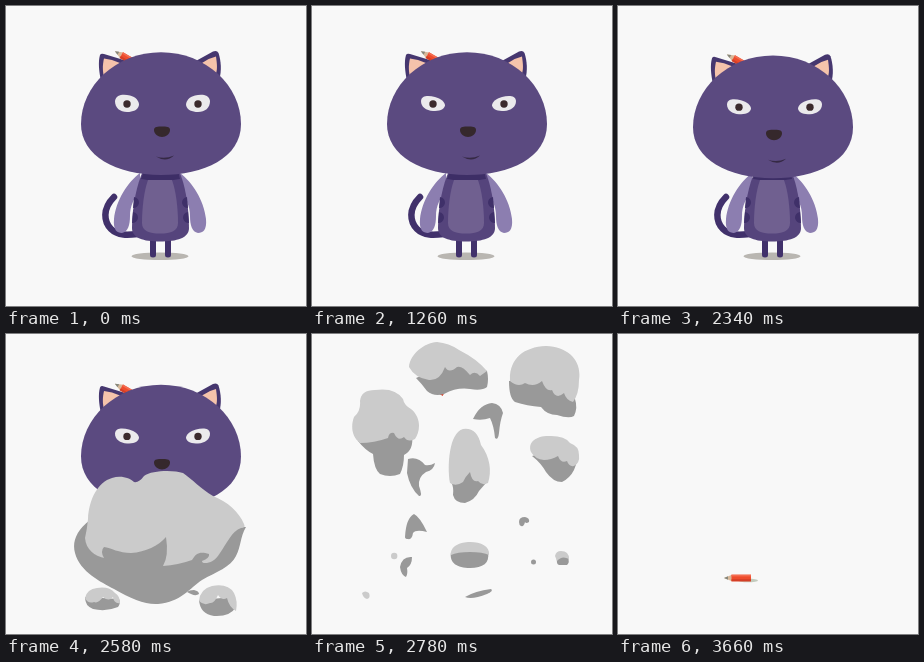
An HTML page that plays this animation: 300x300 px, repeating every 6.5 s.

```html
<!DOCTYPE html>
<html lang="en">
<head>
<meta charset="utf-8">
<title>Cat in smoke</title>
<style>
html, body { margin: 0; width: 100%; height: 100%; overflow: hidden; background: #f8f8f8; }
svg { display: block; width: 100%; height: 100%; }
.light { fill: #cbcbcb; }
.dark { fill: #999; }
</style>
</head>
<body>
<svg viewBox="0 0 300 300">
  <ellipse id="catShadow" cx="154" cy="250.3" rx="28.5" ry="3.8" fill="#b9b6b1"/>
  <ellipse id="pencilShadow" cx="130" cy="246.4" rx="10" ry="1.8" fill="#c3cbbd"/>

  <g id="body">
    <path d="M108 191C96 203 98 216 105 223C112 230 122 229 132 228" fill="none" stroke="#41316b" stroke-width="6.5" stroke-linecap="round"/>
    <g fill="#41316b">
      <path d="M144 232h6v17q0 2.5-3 2.5t-3-2.5z"/>
      <path d="M159 232h6v17q0 2.5-3 2.5t-3-2.5z"/>
    </g>
    <g fill="#8c7eb0">
      <path id="arm" d="M134 167C122 176 110 194 108 213C107 224 111 227 116 227C122 226 124 219 124 210C124 200 128 192 134 185z"/>
      <use href="#arm" transform="matrix(-1 0 0 1 308 0)"/>
    </g>
    <path d="M137 165H173C179 178 183 200 183 222C183 232 171 235.500 154 235.500C137 235.500 126 232 126 222C126 200 131 178 137 165z" fill="#55447c"/>
    <path d="M138 165H172L174 173Q154 177 135 173z" fill="#3d2e66"/>
    <g id="spots" fill="#3f3069">
      <path d="M128 191Q133 192 133 197Q132 202 127 202z"/>
      <path d="M127 206Q132 207 132 212Q131 217 126 217z"/>
    </g>
    <use href="#spots" transform="matrix(-1 0 0 1 309 0)"/>
    <path d="M142 174H166C170 185 172 202 172 217C172 225 165 227.500 154 227.500C143 227.500 136 225 136 217C136 202 138 185 142 174z" fill="#706090"/>
  </g>

  <g id="ears">
    <path d="M95 75C93 65 92 56 94 49Q95 47 98 48L121 55z" fill="#46376f"/>
    <path d="M98 71C96 63 97 57 98 52.500Q106 53 114 57z" fill="#f5c3ab"/>
    <path d="M188 56L207 45.500Q211 44 212.500 47C215 55 216 64 213 75z" fill="#46376f"/>
    <path d="M196 57Q203 52 210 50.500C211 58 212 64 209 70z" fill="#f5c3ab"/>
  </g>

  <g id="pencil">
    <path d="M-14 0L-6-3.300V3.300z" fill="#d8b899"/>
    <path d="M-14 0L-10-1.700V1.700z" fill="#85877c"/>
    <path d="M-6.500-3.300H13V3.300H-6.500z" fill="#ee4c2d"/>
    <path d="M-6.500 1.200H13V3.300H-6.500z" fill="#d43f27"/>
    <path d="M-6.500-3.300H13V-1.600H-6.500z" fill="#f46c50"/>
  </g>

  <g id="head">
    <path d="M155 46.300C200 46.300 235 80 235 118C235 152 198 169 155 169C110 169 75 150 75 118C75 80 110 46.300 155 46.300z" fill="#5b4a80"/>
    <g id="eye">
      <path id="white" fill="#ebeaec"/>
      <circle cx="121" cy="98" r="3.700" fill="#3b2a2c"/>
    </g>
    <use href="#eye" transform="matrix(-1 0 0 1 313 0)"/>
    <path d="M148 124C148 120.500 152 120.500 156 120.500C160 120.500 164 120.500 164 124C164 128 160 131 156 131C152 131 148 128 148 124z" fill="#35282c"/>
    <path d="M150 150.500Q159 153.500 168 149.500Q160 157 150 150.500z" fill="#352944"/>
  </g>

  <g id="cloud">
    <path class="dark" d="M84 186C70 197 66 208 69 219C74 238 95 248 108 255C125 265 140 271 152 270C175 268 184 254 196 246C210 238 225 233 230 222C235 213 234 203 240 193z"/>
    <path class="light" d="M82 185C83 165 92 148 106 144C115 141 124 144 128 148Q133 149 138 142C146 136 168 136 177 139C186 145 195 155 207 162C222 168 233 178 238 190Q240 194 235 194C226 197 221 209 214 219C209 227 204 229 199 229Q196 229 196 227Q204 224 203 220C194 217 190 219 186 226Q172 231 157 232Q163 222 160 203C152 212 140 218 125 219C113 219 105 214 98 213Q94 217 98 224C89 222 80 216 79 204Q81 196 82 185z"/>
    <path class="dark" d="M181 258Q183 256 188 256Q193 257 193 260Q189 263 181 258z"/>
    <path class="dark" d="M79 263Q79 272 87 275Q100 278 112 273Q115 269 113 265z"/>
    <path class="light" d="M79 264Q81 255 91 254Q103 252 109 259Q114 262 114 269Q108 270 107 263Q103 268 97 263Q92 270 88 268Q82 270 79 264z"/>
    <path class="dark" d="M193 266Q194 280 208 282Q224 283 230 273L228 263z"/>
    <path class="light" d="M193 267Q194 255 206 252Q222 249 228 259Q232 267 230 277Q223 273 221 264Q216 267 212 261Q208 270 204 269Q198 272 193 267z"/>
  </g>
  <g id="puffs"></g>
</svg>

<script>
const LOOP = 6500, STEP = 40;
const $ = id => document.getElementById(id);
const clamp = v => Math.min(1, Math.max(0, v));
const part = (t, a, b) => clamp((t - a) / (b - a));
const mix = (a, b, p) => a + (b - a) * p;
const smooth = p => p * p * (3 - 2 * p);
const easeOut = p => 1 - (1 - p) ** 2;
const show = (el, on) => el.style.display = on ? "" : "none";

// centre x, centre y, dark path, light path
const PUFFS = [
  [136, 35, "M104 44Q110 50 115 57Q122 63 132 60Q145 53 158 55Q170 57 175 53Q177 45 175 37L150 27L130 33z",
    "M97 33C98 20 112 9 125 8Q137 9 147 16Q165 25 175 37L168 42Q163 36 158 41Q150 31 145 33Q137 40 133 33Q128 47 117 46Q103 44 97 33z"],
  [232, 47, "M197 47Q197 64 203 68Q215 72 229 73Q235 81 245 81Q257 85 262 82Q266 74 263 65L240 42z",
    "M198 47C197 25 211 13 234 12C257 13 270 27 267 46Q267 60 261 68Q254 66 252 59Q244 66 240 56Q234 58 230 47Q222 54 213 49Q206 54 198 47z"],
  [74, 98, "M46 107Q53 116 61 120Q62 135 68 140Q78 144 88 140Q92 132 92 121Q102 116 100 101L80 90z",
    "M48 109C39 102 39 91 42 83Q49 77 48 67Q49 56 63 56Q83 53 91 65Q92 71 99 75C110 84 108 98 103 105Q96 109 92 103Q86 108 82 99Q77 98 76 104Q62 109 48 109z"],
  [157, 132, "M139 148Q142 153 141 161Q143 169 153 169Q163 166 167 157L174 149L158 136z",
    "M138 149C135 132 137 99 151 95Q165 93 169 111C178 123 180 137 176 149Q170 152 166 147Q160 149 158 138Q153 143 151 148Q144 153 138 149z"],
  [243, 125, "M220 122Q229 129 234 138Q241 148 250 148Q258 144 262 136Q264 131 266 124L240 116z",
    "M219 118C215 107 226 101 239 102Q253 102 258 109Q267 112 267 121Q268 129 262 132Q257 133 255 127Q249 130 246 122Q239 126 232 126Q223 125 219 118z"],
  [177, 87, "M161 85Q168 70 180 69Q189 70 191 79Q188 87 187 99Q186 107 183 104Q182 92 178 84Q170 87 161 85z"],
  [109, 142, "M96 125Q106 122 113 131Q118 132 123 129Q122 136 114 138Q106 143 107 152Q111 163 107 162Q98 154 95 139z"],
  [104, 193, "M93 203Q94 184 102 180Q108 183 115 198Q104 195 101 199Q100 206 96 205Q93 205 93 203z"],
  [94, 233, "M100 223Q90 222 88 233Q89 241 94 243Q96 240 95 234Q100 231 100 223z"],
  [166, 260, "M153 263Q163 257 179 255Q182 257 175 260Q160 266 153 263z"],
  [158, 221, "M139 218C137 229 145 234 158 234C171 234 178 229 176 218z",
    "M139 221C138 212 148 208 158 208C169 208 178 212 177 221Q171 218 158 218Q145 218 139 221z"],
  [212, 187, "M207 188Q207 183 213 183Q218 184 217 188Q214 190 213 188Q212 193 209 192Q207 191 207 188z"],
  [250, 224, "M245 223Q244 230 247 231H255Q258 228 256 223z",
    "M243 222Q244 217 249 217Q257 217 257 225Q250 221 245 227z"],
  [221, 228, "M219 228a2.500 2.500 0 1 0 5 0a2.500 2.500 0 1 0-5 0z"],
  [82, 222, "", "M79 222a3.200 3.200 0 1 0 6.400 0a3.200 3.200 0 1 0-6.400 0z"],
  [54, 261, "", "M50 259Q53 256 57 259Q59 264 55 265Q51 264 50 259z"]
];

const puffs = PUFFS.map(([x, y, dark, light]) => {
  const el = document.createElementNS("http://www.w3.org/2000/svg", "g");
  el.innerHTML = `<path class="dark" d="${dark}"/>` + (light ? `<path class="light" d="${light}"/>` : "");
  $("puffs").append(el);
  return { x, y, el };
});

const scaleAt = (x, y, s, dx = 0, dy = 0) =>
  `translate(${x + dx} ${y + dy}) scale(${s}) translate(${-x} ${-y})`;

// Open and narrowed outlines of the left eye
const OPEN = [109, 95, 110, 88, 118, 88, 124, 89.5, 130, 91, 133, 95, 133, 99, 132, 104, 127, 106, 121, 106, 114, 106, 109, 102, 109, 95];
const NARROW = [109, 95, 109.5, 89, 117, 89.5, 123, 91, 129, 92.5, 133, 96, 133, 99.5, 132, 104, 127, 105, 121, 105, 114, 104.5, 109, 101, 109, 95];

function drawEye(p) {
  const v = OPEN.map((a, i) => mix(a, NARROW[i], p));
  $("white").setAttribute("d", `M${v.slice(0, 2)}C${v.slice(2)}z`);
}

function drawCat(t) {
  const on = t < 2660, sink = 4.4 * smooth(part(t, 1900, 2580));
  for (const id of ["catShadow", "body", "ears", "head"]) show($(id), on);
  $("head").setAttribute("transform", `translate(0 ${sink})`);
  $("ears").setAttribute("transform", `translate(0 ${sink})`);
  drawEye(smooth(part(t, 700, 1020)));
  return on ? sink : 0;
}

function drawPencil(t, sink) {
  const fall = part(t, 3100, 3400) ** 2;
  const hop = part(t, 3400, 3580), tap = part(t, 3580, 3660);
  const lift = 48 * hop * (1 - hop) + 8 * tap * (1 - tap);
  const x = mix(121, 120, fall);
  const y = mix(52.3 + sink, 244, fall) - lift;
  const angle = mix(mix(30, 16, fall), 0, smooth(part(t, 3400, 3620)));
  $("pencil").setAttribute("transform", `translate(${x} ${y}) rotate(${angle})`);
  $("pencilShadow").setAttribute("opacity", part(t, 3300, 3420));
}

function drawSmoke(t) {
  const grow = easeOut(part(t, 2340, 2580)), rise = part(t, 2580, 2660);
  show($("cloud"), t > 2340 && t < 2700);
  $("cloud").setAttribute("transform", rise
    ? scaleAt(152, 204, mix(1, 1.25, rise), 0, -72 * rise)
    : scaleAt(152, 264, grow));

  const spread = easeOut(part(t, 2620, 2780)), fade = part(t, 2780, 3080);
  show($("puffs"), t >= 2660 && fade < 1);
  for (const { x, y, el } of puffs) {
    const pull = 0.5 * (1 - spread);
    const size = mix(1.75, 1, spread) * (1 - smooth(fade));
    el.setAttribute("transform", scaleAt(x, y, size, (152 - x) * pull, (140 - y) * pull - 6 * fade));
  }
}

function draw(ms) {
  const t = Math.max(0, Math.floor((ms - 20) / STEP) * STEP + 20);
  drawPencil(t, drawCat(t));
  drawSmoke(t);
}

const start = performance.now();
function tick() {
  draw((performance.now() - start) % LOOP);
  requestAnimationFrame(tick);
}
tick();
</script>
</body>
</html>
```
